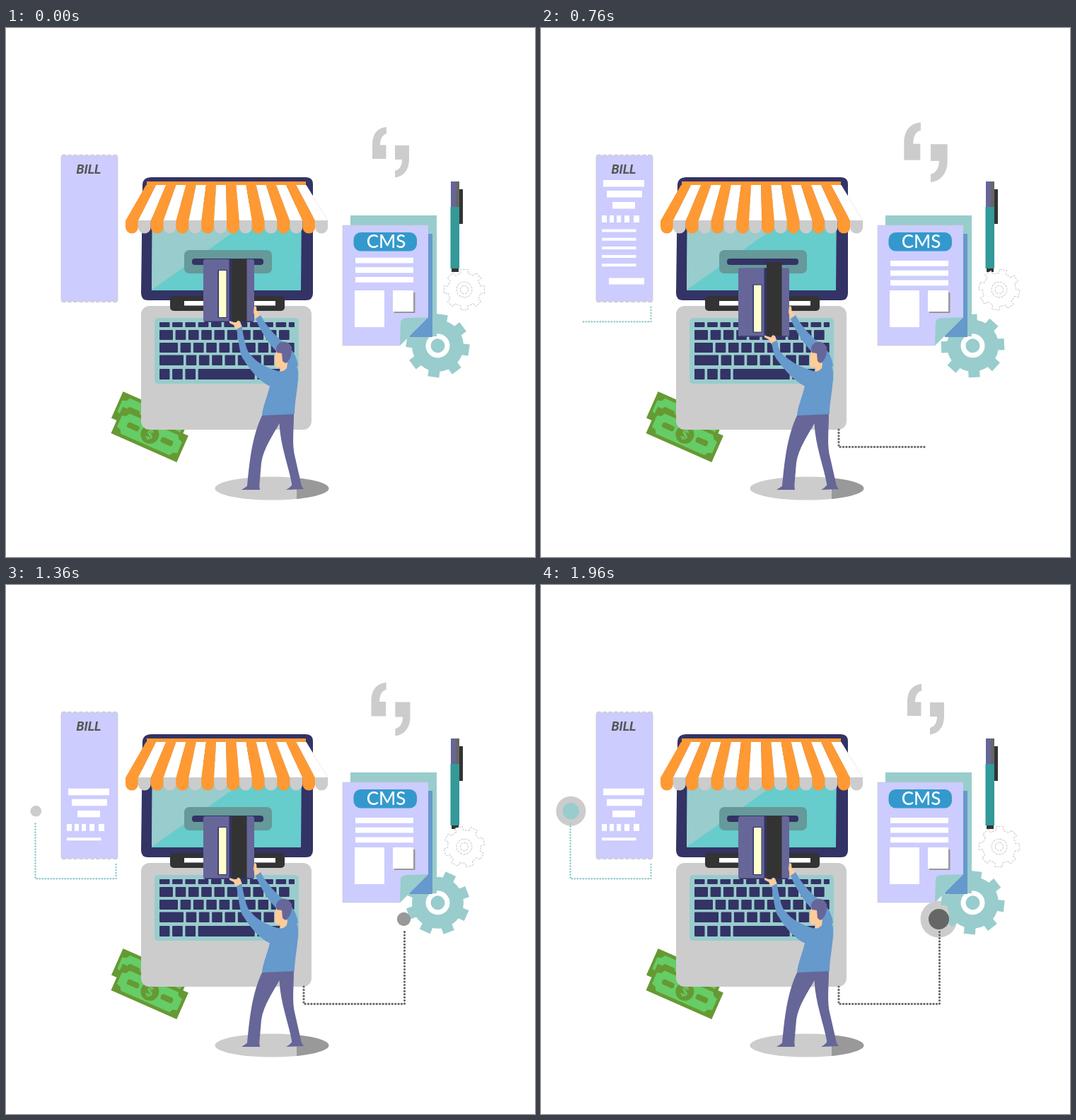
Recreate the animation shown at these times as an HTML page with a canvas. Size 748 px wide and 748 px high, loop 2000 ms.

```html
<!DOCTYPE html>
<html lang="en">
<head>
<meta charset="utf-8">
<title>Online shop</title>
<style>
html, body { margin: 0; width: 100%; height: 100%; overflow: hidden; background: #fff; }
canvas { display: block; }
</style>
</head>
<body>
<canvas id="stage" width="748" height="748"></canvas>
<script>
const c = document.getElementById('stage').getContext('2d');
const LOOP = 2000, FRAME = 40;
const navy = '#333366', purple = '#666699', teal = '#99cccc', aqua = '#66cccc', lilac = '#ccccff',
  blue = '#6699cc', orange = '#ff9933', silver = '#cccccc', grey = '#666666', dark = '#333333',
  skin = '#ffcc99', leaf = '#669933', mint = '#66cc66', white = '#ffffff';

const clamp = (v, a = 0, b = 1) => Math.min(b, Math.max(a, v));
const hump = (t, end) => t < end ? Math.sin(Math.PI * t / end) : 0;

function shape(d, fill) { c.fillStyle = fill; c.fill(new Path2D(d)); }
// Axis-aligned box given by its edges
function box(x1, y1, x2, y2, fill, r = 0) {
  c.fillStyle = fill;
  c.beginPath();
  c.roundRect(x1, y1, x2 - x1, y2 - y1, r);
  c.fill();
}
function disc(x, y, r, fill) {
  c.fillStyle = fill;
  c.beginPath();
  c.arc(x, y, r, 0, 7);
  c.fill();
}
function label(text, x, y, font, fill) {
  c.font = font;
  c.fillStyle = fill;
  c.textAlign = 'center';
  c.fillText(text, x, y);
}
function clipped(x1, y1, x2, y2, draw) {
  c.save();
  c.beginPath();
  c.rect(x1, y1, x2 - x1, y2 - y1);
  c.clip();
  draw();
  c.restore();
}
function placed(x, y, turn, scale, draw) {
  c.save();
  c.translate(x, y);
  c.rotate(turn);
  c.scale(scale, scale);
  draw();
  c.restore();
}
// Linear interpolation through [time, value] pairs
function keyed(t, keys) {
  let i = 1;
  while (i < keys.length - 1 && t > keys[i][0]) i++;
  const [t0, a] = keys[i - 1], [t1, b] = keys[i];
  return a + (b - a) * clamp((t - t0) / (t1 - t0));
}

function note(x, y) {
  placed(x, y, 0.415, 1, () => {
    box(0, 0, 101.5, 41, leaf);
    shape('M13 5H88L91 10L97 12V29L91 31L88 36H13L10 31L4 29V12L10 10Z', mint);
    box(16, 16, 34, 24, leaf, 3);
    box(68, 16, 86, 24, leaf, 3);
    disc(51, 20.5, 13, leaf);
    label('$', 51, 27, 'bold 18px Lato, sans-serif', mint);
  });
}

function billPaper(t) {
  c.beginPath();
  c.moveTo(78, 183);
  for (let i = 0; i < 10; i++) c.arc(82 + i * 8, 183, 4, Math.PI, 0);
  for (let i = 9; i >= 0; i--) c.arc(82 + i * 8, 384, 4, 0, Math.PI);
  c.closePath();
  c.fillStyle = lilac;
  c.fill();
  c.strokeStyle = silver;
  c.lineWidth = 0.8;
  c.stroke();
  label('BILL', 117, 206, 'italic bold 18px Roboto, sans-serif', '#555555');

  const start = t >= 1640 ? 1640 : t >= 1040 ? 1040 : 0;
  const shift = 170 * (1 - clamp((t - start) / 560));
  clipped(78, 200, 158, 367, () => {
    c.translate(0, shift);
    box(88, 215, 146, 224.5, white);
    box(93, 230, 143, 239.5, white);
    box(101, 246, 133, 255.5, white);
    for (const [x, w] of [[86, 7], [97, 6], [107, 6], [118, 7], [131, 8]]) box(x, 265, x + w, 275, white);
    for (let i = 0; i < 5; i++) box(86, 284.5 + i * 12.2, 134.5, 288.5 + i * 12.2, white);
    box(96, 353.5, 146, 362.5, white);
  });
}

function laptop() {
  shape('M205 211H424Q434 211 434 221V375Q434 385 424 385H201Q191 385 191 375L193 221Q194 211 205 211Z', navy);
  shape('M207 250H418L417 371H206Z', aqua);
  shape('M207 250H376L208 369H206Z', teal);
  box(252, 314, 376, 347, '#669999', 7);
  box(263, 326, 364, 335, navy, 4);

  // Awning
  box(199, 217, 424, 223, orange);
  for (let i = 0; i < 16; i++) {
    const top = 198 + i * 14.15, low = 169 + i * 17.88, w = 17.88;
    const odd = i % 2;
    shape(`M${top} 222h14.3L${low + w + .2} 272.5H${low}Z`, odd ? white : orange);
    box(low, 272, low + w, 290.5, odd ? silver : orange, [0, 0, 8.9, 8.9]);
  }
  c.strokeStyle = '#dddddd';
  c.lineWidth = 0.6;
  c.stroke(new Path2D('M424 222L455 272'));

  box(191, 393, 432, 568, silver, 12);
  box(232, 379, 394, 400, dark, 5);
  box(252, 386, 381, 392.5, white);
  box(210, 410, 414, 503, teal, 5);
  const rows = [[416, 423, 14.5], [427, 441, 19], [445, 459, 26], [462.5, 477, 34], [482, 497, 14.5]];
  rows.forEach(([y1, y2, first], row) => {
    let x = 217;
    for (let i = 0; x < 404; i++) {
      const w = i === 0 ? first : row === 4 && i === 3 ? 80 : 14.7;
      box(x, y1, Math.min(x + w, 408), y2, navy, 1);
      x += w + 3.6;
    }
  });
}

function card(dy) {
  const top = 327 + dy * 0.6, low = 416 + dy;
  box(279, top, 351, low, purple, 3);
  box(315.5, top, 319.5, low, navy);
  box(319, 327 + dy * 0.2, 340.5, low, dark);
  box(299.5, 342 + dy, 312.5, 410 + dy, navy);
  box(301, 343 + dy, 311.5, 409 + dy, '#ffffcc');
  box(281, low - 1.4, 349, low, navy);
}

function man(dy) {
  c.save();
  c.beginPath();
  c.ellipse(376, 651, 80.5, 16.5, 0, 0, 7);
  c.clip();
  box(290, 630, 411, 670, silver);
  box(411, 630, 460, 670, '#999999');
  c.restore();

  shape('M333 653Q340 649 345 644L358 646L359 653ZM396 653Q402 650 406 644L417 646L421 652Z', purple);
  shape('M363 546L407 545C407 570 404 590 409 608L418 648L405 649C400 620 388 592 386.5 559C378 575 364 594 361 615L358 650L341 648C344 618 347 578 363 546Z', purple);

  // Far arm and hand
  shape('M351 393L354 394L354.5 400L359 405L358 409L353 411L350 402Z', skin);
  shape('M353 411L360 406C366 418 377 431 388 441C401 450 411 460 413 478L400 482L385 460C374 449 360 430 353 411Z', blue);

  shape('M384 487L397 476C404 468 414 476 413 490C413 510 408 528 408 546L362 548C363 535 370 520 373 506Z', blue);
  shape('M382 457L391 459L393 470L398 474L397 481Q391 487 387 485L388 480L381 480Q379 466 382 457Z', skin);
  shape('M382 453C384 443 394 442 400 446L404 451C405 461 402 470 395 474L391 471L390 460L383 459Z', purple);

  // Near arm follows the card
  const hand = 423 + dy * 0.95, elbow = 462 + dy * 0.15;
  placed(0, dy, 0, 1, () =>
    shape('M316 414L325 417L328 413.5L331 415L334 423L326 427L322 420L316 417Z', skin));
  shape(`M326 ${hand + 3}L333.5 ${hand - 1}C336 ${hand + 14} 340 ${elbow - 4} 346 ${elbow}C354 472 366 480 388 486L380 508L372 506C360 500 346 486 336 ${elbow + 7}C330 ${elbow} 329 ${hand + 18} 326 ${hand + 3}Z`, blue);
}

function documents(t) {
  box(487, 265, 609, 436, teal);
  box(571, 291, 603, 437, blue);
  shape('M476 279H597V409L557 449H476Z', lilac);
  shape('M597 409L557 449L558 415Q560 410 568 410Z', teal);
  c.strokeStyle = silver;
  c.lineWidth = 0.6;
  c.stroke(new Path2D('M597 279H476V449H557'));
  box(491.5, 289, 581, 315.5, '#3399cc', 10);
  label('CMS', 537.5, 310.8, '500 26px Lato, sans-serif', white);

  const lift = keyed((t + 40) % 1000, [[28, 0], [150, 44], [250, 44], [393, 0], [580, 0], [690, 44], [790, 0]]);
  clipped(476, 323, 597, 366, () => {
    for (let i = 0; i < 3; i++) box(494, 329 + i * 13.7 - lift, 576, 336.8 + i * 13.7 - lift, white);
  });
  box(493, 371, 535, 423, white);
  box(549, 374, 578.5, 403, '#999999');
  box(547, 371, 576, 401, white);
}

function pen() {
  box(640, 228, 646, 277, dark);
  box(629, 217, 636, 254, purple);
  box(636, 217, 641, 254, grey);
  box(628.5, 253, 641, 340, '#339999');
  box(630, 340, 640, 345, dark);
}

function quotes(t) {
  placed(544, 175.5, 0, 1 + 0.18 * hump(t, 1520), () => {
    c.translate(-544, -175.5);
    shape('M518 185V165C518 150 525 141 538 140V149.5C532 151 529 157 529 165.5H537.5V185Z', silver);
    shape('M550 166H570V186C570 201 562 210 550 211.5V202C557 200 560 194 560 186H550Z', silver);
  });
}

function gearPath(teeth, inner, outer, baseHalf, tipHalf) {
  const p = new Path2D(), step = 2 * Math.PI / teeth;
  const at = (a, r) => p.lineTo(r * Math.cos(a), r * Math.sin(a));
  for (let i = 0; i < teeth; i++) {
    const a = i * step;
    at(a - baseHalf, inner);
    at(a - tipHalf, outer);
    at(a + tipHalf, outer);
    p.arc(0, 0, inner, a + baseHalf, a + step - baseHalf);
  }
  p.closePath();
  return p;
}
const gear = gearPath(8, 36.5, 45.3, 0.22, 0.18);

function gears(t) {
  const turn = t / LOOP * Math.PI / 2;
  placed(610.5, 449.3, turn + 0.14, 1, () => {
    c.fillStyle = teal;
    c.fill(gear);
    disc(0, 0, 17, white);
    disc(0, 0, 10, teal);
  });
  placed(648, 370, -turn, 0.64, () => {
    c.fillStyle = white;
    c.fill(gear);
    c.strokeStyle = silver;
    c.lineWidth = 1.6;
    c.setLineDash([5, 2]);
    c.stroke(gear);
    for (const r of [17, 9]) {
      c.beginPath();
      c.arc(0, 0, r, 0, 7);
      c.stroke();
    }
  });
}

// Dotted line through the points, drawn up to the given share of its length
function trail(points, share, gap, size, fill) {
  const spans = points.slice(1).map(([x, y], i) => Math.hypot(x - points[i][0], y - points[i][1]));
  const end = share * spans.reduce((a, b) => a + b);
  for (let s = 0; s < end; s += gap) {
    let i = 0, rest = s;
    while (rest > spans[i]) rest -= spans[i++];
    const k = rest / spans[i], [x0, y0] = points[i], [x1, y1] = points[i + 1];
    disc(x0 + (x1 - x0) * k, y0 + (y1 - y0) * k, size / 2, fill);
  }
}

function draw(t) {
  c.fillStyle = white;
  c.fillRect(0, 0, 748, 748);
  const dy = 21 * hump(t, 1350);
  const drawn = clamp((t - 125) / 1155);
  const dot = clamp((t - 1250) / 165);
  const halo = t > 1610 ? clamp(0.57 + (t - 1610) / 720) : 0;
  const solid = t >= 1420;

  note(165.5, 514);
  note(165, 535.5);
  billPaper(t);
  laptop();
  card(dy);
  man(dy);
  quotes(t);
  pen();

  disc(562.5, 472.5, 26 * halo, silver);
  disc(42.3, 319.7, 21 * halo, silver);
  gears(t);
  documents(t);
  trail([[155.5, 395], [155.5, 415.3], [41.5, 415.3], [41.5, 334]], drawn, 4, 2.7, teal);
  trail([[421, 568], [421, 592.3], [563.5, 592.3], [563.5, 489]], drawn, 4.4, 3.2, grey);
  disc(42.3, 319.7, 11.7 * dot, solid ? teal : silver);
  disc(562.5, 472.5, 14.5 * dot, solid ? grey : '#999999');
}

const began = performance.now();
function tick() {
  const t = (performance.now() - began) % LOOP;
  draw(Math.floor(t / FRAME) * FRAME);
  requestAnimationFrame(tick);
}
tick();
</script>
</body>
</html>
```
